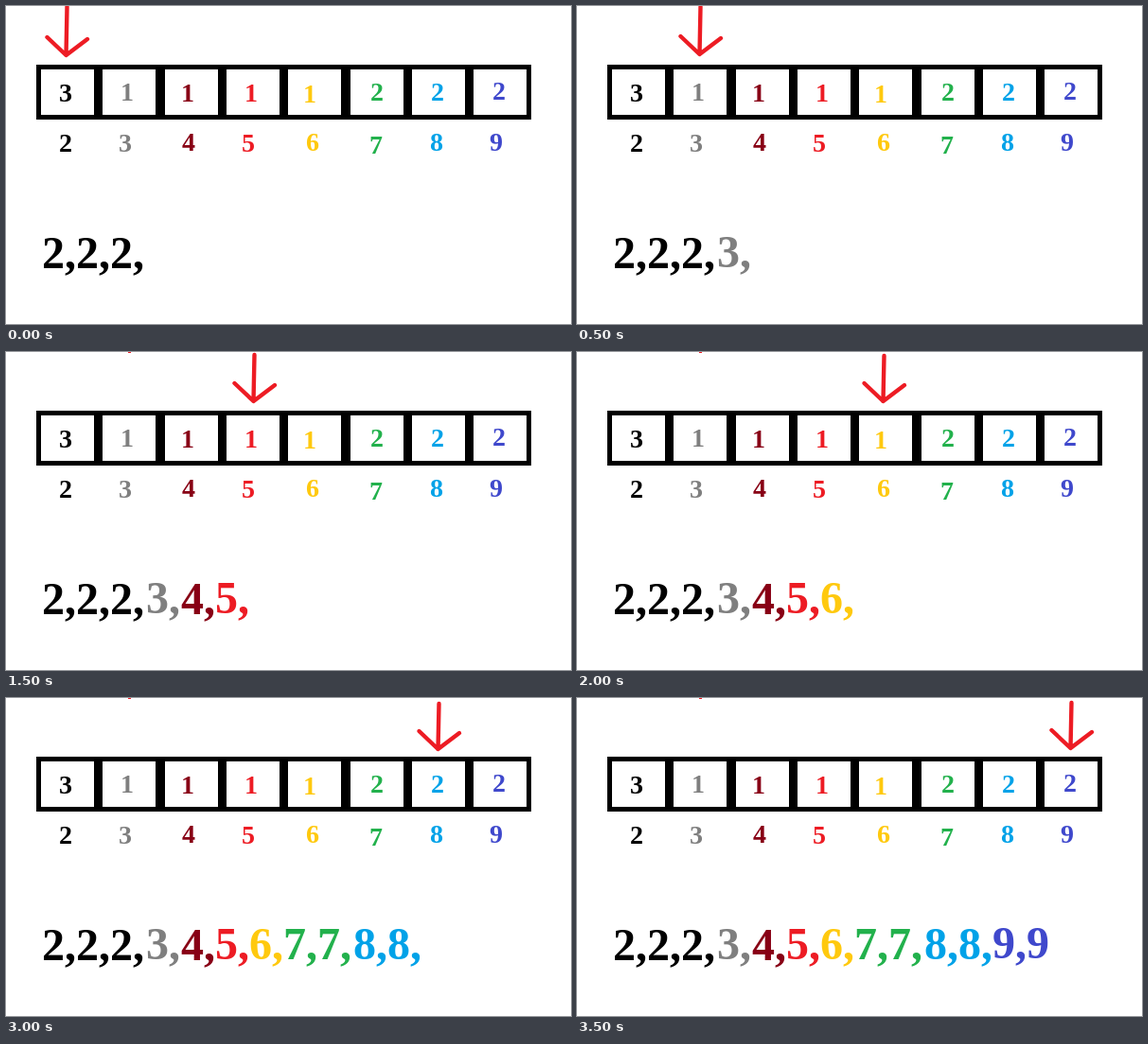
These frames come from a looping animation (597x336 px, 4000 ms). An HTML page:

```html
<!DOCTYPE html>
<html lang="en">
<head>
<meta charset="utf-8">
<title>Counting sort output</title>
<style>
  html, body { margin: 0; width: 100%; height: 100%; overflow: hidden; background: #fff; }
  svg { display: block; }
  text { font: bold 28px "Liberation Serif", "Times New Roman", serif; font-kerning: none; }
  .top, .bottom { text-anchor: middle; }
  .out { font-size: 48px; }
  .arrow { fill: none; stroke: #ed1c24; stroke-width: 4.4; stroke-linecap: round; stroke-linejoin: round; }
</style>
</head>
<body>
<svg id="stage" width="597" height="336" viewBox="0 0 597 336"></svg>
<script>
const STEP = 500;
const stage = document.getElementById('stage');

// top and bottom: [x, baseline]; out: [x, baseline]; arrow: [x, tip y, shaft top]
const cells = [
  { color: '#000000', count: 3, top: [63, 101], bottom: [63, 154], out: [38, 277], arrow: [64, 52, 1] },
  { color: '#7f7f7f', count: 1, top: [128, 100], bottom: [126, 154], out: [148, 276], arrow: [130, 51, 1] },
  { color: '#880015', count: 1, top: [192, 101], bottom: [193, 153], out: [185, 277], arrow: [195, 52, 4] },
  { color: '#ed1c24', count: 1, top: [259, 101], bottom: [256, 154], out: [221, 276], arrow: [262, 52, 3] },
  { color: '#ffc90e', count: 1, top: [321, 102], bottom: [324, 153], out: [257, 276], arrow: [324, 52, 4] },
  { color: '#22b14c', count: 2, top: [392, 100], bottom: [391, 156], out: [293, 276], arrow: [392, 55, 7] },
  { color: '#00a2e8', count: 2, top: [456, 100], bottom: [455, 153], out: [367, 276], arrow: [457, 54, 6] },
  { color: '#3f48cc', count: 2, top: [521, 99], bottom: [518, 153], out: [439, 275], arrow: [522, 53, 5] }
];

function add(tag, attrs, content = '') {
  const el = document.createElementNS('http://www.w3.org/2000/svg', tag);
  for (const key in attrs) el.setAttribute(key, attrs[key]);
  el.textContent = content;
  return stage.appendChild(el);
}

function label(kind, cell, content) {
  const [x, y] = cell[kind];
  return add('text', { class: kind, x, y, fill: cell.color }, content);
}

add('rect', { x: 32, y: 62, width: 523, height: 58 });

cells.forEach((cell, i) => {
  add('rect', { x: Math.round(37 + i * 65.3), y: 67, width: 56, height: 48, fill: '#fff' });
  const value = i + 2;
  const last = i === cells.length - 1;
  label('top', cell, cell.count);
  label('bottom', cell, value);
  cell.output = label('out', cell, Array(cell.count).fill(value).join(',') + (last ? '' : ','));

  const [x, y, top] = cell.arrow;
  cell.pointer = add('path', {
    class: 'arrow',
    d: `M${x + .5} ${top}L${x - .5} ${y}M${x - 20.5} ${y - 19}L${x - .5} ${y}L${x + 22} ${y - 17}`
  });
});

// Small piece of the second arrow that stays after it moves on
const speck = add('rect', { x: 129, y: 0, width: 3, height: 1, fill: '#ed1c24' });

const show = (el, on) => el.setAttribute('visibility', on ? 'visible' : 'hidden');

function draw() {
  const step = Math.floor(performance.now() / STEP) % cells.length;
  cells.forEach((cell, i) => {
    show(cell.output, i <= step);
    show(cell.pointer, i === step);
  });
  show(speck, step > 1);
  requestAnimationFrame(draw);
}
draw();
</script>
</body>
</html>
```
